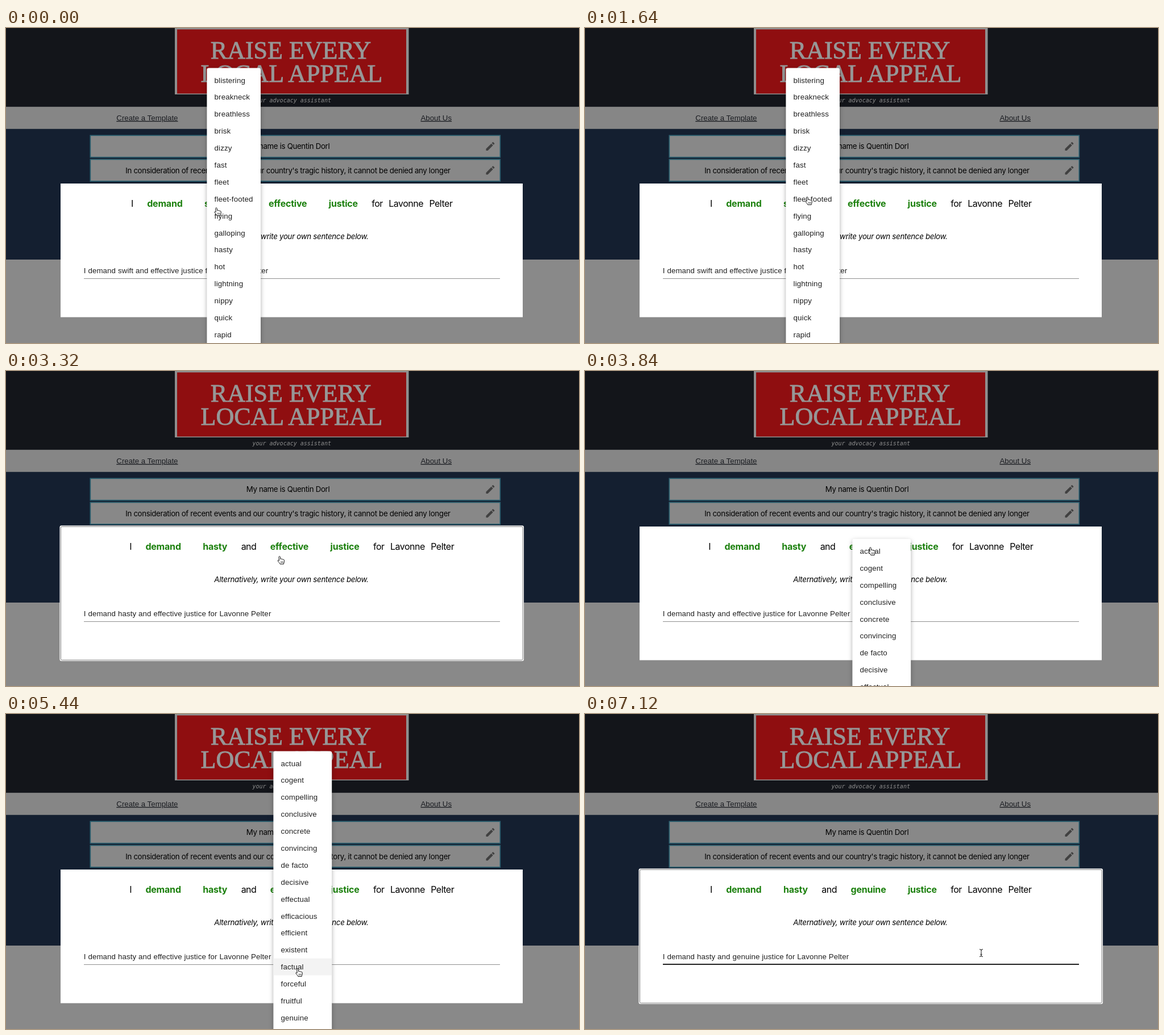
Write an HTML page that moves like this. It is 1008 px wide and 555 px high and loops after 8000 ms.

```html
<!DOCTYPE html>
<html lang="en">
<head>
<meta charset="utf-8">
<title>Sentence builder</title>
<style>
  html, body { margin: 0; width: 100%; height: 100%; overflow: hidden; background: #898989; }
  svg { display: block; width: 100vw; height: 100vh; }
  text { white-space: pre; }
  .sans { font: 13.28px "Liberation Sans", Arial, sans-serif; }
  .nav { fill: #1b1d22; text-decoration: underline; }
  .field, .item { fill: #212121; letter-spacing: .125px; }
  .card { font: 13.28px Inter, sans-serif; letter-spacing: -.33px; text-anchor: middle; }
  .hint { font: italic 13.28px Inter, sans-serif; letter-spacing: -.28px; text-anchor: middle; }
  .tag { font: italic 10px "DejaVu Sans Mono", monospace; fill: #8f8f8f; text-anchor: middle; }
  .title { font: 44px "Liberation Serif", serif; fill: #979797; stroke: #979797; stroke-width: .9; text-anchor: middle; }
  .word { font: 16px Inter, sans-serif; letter-spacing: -.5px; }
  .pick { font-weight: 700; letter-spacing: -.2px; fill: #1c800e; }
  .paper { fill: #fff; filter: drop-shadow(0 3px 3px rgba(0,0,0,.2)) drop-shadow(0 2px 5px rgba(0,0,0,.14)); }
</style>
</head>
<body>
<svg id="stage" viewBox="0 0 1008 555" preserveAspectRatio="none"></svg>
<script>
const LOOP = 8000;
const ROW = 29.88, MENU_PAD = 6.6;
const FIRST_PICK = 1900, FOCUS_LOST = 3490, MENU_OPENS = 3840, MENU_SETTLES = 3930, SECOND_PICK = 6680;
const FIELD_HOVER = 7030;
const stage = document.getElementById("stage");

function add(parent, tag, attrs = {}, content) {
  const el = document.createElementNS("http://www.w3.org/2000/svg", tag);
  for (const key in attrs) el.setAttribute(key, attrs[key]);
  if (content) el.textContent = content;
  return parent.appendChild(el);
}
const box = (parent, x, y, width, height, fill, more = {}) =>
  add(parent, "rect", { x, y, width, height, fill, ...more });
const label = (parent, x, y, cls, content) =>
  add(parent, "text", { x, y, class: cls }, content);
const show = (el, on) => el.setAttribute("visibility", on ? "visible" : "hidden");
const clamp = p => Math.min(1, Math.max(0, p));
const ease = p => p * p * (3 - 2 * p);

// Dimmed page
const PENCIL = "M3 17.25V21h3.75L17.81 9.94l-3.75-3.75zM20.71 7.04c.39-.39.39-1.02 0-1.41" +
  "l-2.34-2.34c-.39-.39-1.02-.39-1.41 0l-1.83 1.83 3.75 3.75z";

function drawCard(middle, content) {
  box(stage, 148.3, middle - 19.2, 721, 38.4, "#888", { stroke: "#2a6070", "stroke-width": 1.7 });
  label(stage, 496, middle + 4.8, "card", content);
  add(stage, "path", { d: PENCIL, fill: "#414141", transform: `translate(842 ${middle - 10}) scale(.83)` });
}

box(stage, 0, 0, 1008, 139, "#13151a");
box(stage, 297, 0, 411.5, 117, "#8f8f8f");
box(stage, 301, 2.5, 403, 113, "#8f0e10");
label(stage, 501, 53.5, "title", "RAISE EVERY");
label(stage, 502.5, 95, "title", "LOCAL APPEAL");
label(stage, 502.7, 131, "tag", "your advocacy assistant");
box(stage, 0, 138.8, 1008, 39, "#868686");
label(stage, 194.3, 162.8, "sans nav", "Create a Template");
label(stage, 729.5, 162.8, "sans nav", "About Us");
box(stage, 0, 177.8, 1008, 230.2, "#141f30");
drawCard(208.5, "My name is Quentin Dorl");
drawCard(250.7, "In consideration of recent events and our country's tragic history, it cannot be denied any longer");

// Dialog
const ring = add(stage, "g");
box(ring, 94.5, 272.3, 816.5, 238.7, "#fff", { rx: 3 });
box(stage, 96, 274, 813, 235.5, "#fff");
const ringLine = box(stage, 96.4, 274.1, 812.8, 235.2, "none", { rx: 2, stroke: "#777" });
label(stage, 502, 371.6, "hint", "Alternatively, write your own sentence below.");
const underline = box(stage, 137, 441, 732, 1, "#8f8f8f");

// Words flow in one centred row; words in *stars* are buttons with side padding
function makeSentence(source) {
  const gap = 10.4, pad = 14;
  const group = add(stage, "g");
  let x = 0;
  for (const part of source.split(" ")) {
    const pick = part[0] === "*";
    const inset = pick ? pad : 0;
    const word = label(group, x + inset, 314.7, pick ? "word pick" : "word", part.replaceAll("*", ""));
    x += word.getComputedTextLength() + 2 * inset + gap;
  }
  const left = 502.7 - (x - gap) / 2;
  for (const word of group.children) word.setAttribute("x", +word.getAttribute("x") + left);
  label(group, 136.8, 432.4, "sans field", source.replaceAll("*", ""));
  return group;
}
const sentences = ["*swift* and *effective*", "*hasty* and *effective*", "*hasty* and *genuine*"]
  .map(middle => makeSentence(`I *demand* ${middle} *justice* for Lavonne Pelter`));

// Menus
function makeMenu(x, width, items) {
  const group = add(stage, "g");
  add(group, "rect", { class: "paper", width, height: 560, rx: 3.3 });
  const hover = box(group, 0, 0, width, ROW, "#f3f3f3");
  items.split(",").forEach((item, i) =>
    label(group, 13.2, 26.2 + i * ROW, "sans item", item));
  return { group, hover, x };
}
const speedMenu = makeMenu(353.4, 94.6,
  "blistering,breakneck,breathless,brisk,dizzy,fast,fleet,fleet-footed,flying,galloping,hasty,hot,lightning,nippy,quick,rapid");
const kindMenu = makeMenu(470.4, 102.8,
  "actual,cogent,compelling,conclusive,concrete,convincing,de facto,decisive,effectual,efficacious,efficient,existent,factual,forceful,fruitful,genuine");

// close: 0 is fully open, 1 is gone; it fades first, then shrinks
function placeMenu(menu, top, close, row) {
  const shrink = clamp(close * 1.5 - .5);
  const sx = 1 - .25 * shrink, sy = 1 - .4375 * shrink;
  show(menu.group, close < 1);
  menu.group.setAttribute("opacity", 1 - close);
  menu.group.setAttribute("transform",
    `translate(${menu.x} ${top + 235 * (1 - sy)}) scale(${sx} ${sy})`);
  menu.hover.setAttribute("opacity", row < 0 ? 0 : 1);
  menu.hover.setAttribute("y", MENU_PAD + row * ROW);
}
const closing = (t, pick) => clamp((t - pick + 60) / 290) * (t >= pick);

// Pointers
const pointers = { hand: add(stage, "g"), arrow: add(stage, "g"), beam: add(stage, "g") };
const ink = { stroke: "#111", "stroke-linejoin": "round" };
add(pointers.hand, "path", { ...ink, fill: "#fff",
  d: "M3.2 8.4L2.7 2.4C2.6.2 5 .1 5.2 2.2L5.6 5.6C6.2 4.8 7.6 5 7.8 6C8.4 5.3 9.7 5.6 9.9 6.6" +
     "C10.7 6 12.2 6.4 12.2 7.8V10C12.2 12 11.2 12.4 11.2 14.4H4.8C4.6 12.8 2.1 10.8.9 8.8C.4 7.6 2 7 3.2 8.4Z" });
add(pointers.hand, "path", { ...ink, d: "M6.4 9.6v3M8.2 9.6v3M10 9.6v3", "stroke-width": .7 });
add(pointers.arrow, "path", { fill: "#000", stroke: "#fff", "stroke-width": .8,
  d: "M.8.5V12.7L3.5 10.1 5.4 14.2 7.2 13.4 5.4 9.4H9Z" });
add(pointers.beam, "path", { ...ink, fill: "none",
  d: "M-3-6.5Q0-6.5 0-4.5V4.5Q0 6.5-3 6.5M3-6.5Q0-6.5 0-4.5M0 4.5Q0 6.5 3 6.5M-1.5 2.5H1.5" });

// Each glide eases from wherever the pointer rests
const glides = [
  { from: 180, to: 520, x: 411, y: 318 },
  { from: 520, to: 1120, x: 372, y: 211 },
  { from: 1120, to: 1640, x: 387, y: 297 },
  { from: 1640, to: 1980, x: 394, y: 389 },
  { from: 2900, to: 3490, x: 498, y: 310 },
  { from: 4740, to: 4820, x: 498, y: 315 },
  { from: 4820, to: 5440, x: 509, y: 448 },
  { from: 5720, to: 6070, x: 526, y: 534 },
  { from: 6600, to: 7120, x: 697, y: 421 }
];

function pointerAt(t) {
  return glides.reduce((at, { from, to, x, y }) => {
    const p = ease(clamp((t - from) / (to - from)));
    return { x: at.x + (x - at.x) * p, y: at.y + (y - at.y) * p };
  }, { x: 366, y: 316 });
}

function pointerKind(t) {
  if (t >= FIELD_HOVER) return "beam";
  const idle = (t > FIRST_PICK + 80 && t < FOCUS_LOST - 180) || t >= SECOND_PICK;
  return idle ? "arrow" : "hand";
}

function render(t) {
  const state = (t >= FIRST_PICK) + (t >= SECOND_PICK);
  sentences.forEach((group, i) => show(group, i === state));

  const focused = (t >= FIRST_PICK && t < FOCUS_LOST) || t >= SECOND_PICK;
  show(ring, focused);
  show(ringLine, focused);

  const active = t >= FIELD_HOVER;
  underline.setAttribute("y", active ? 440 : 441);
  underline.setAttribute("height", active ? 2 : 1);
  underline.setAttribute("fill", active ? "#212121" : "#8f8f8f");

  placeMenu(speedMenu, 70.4, closing(t, FIRST_PICK), -1);

  // The highlight trails the pointer slightly
  const settled = t >= MENU_SETTLES;
  const top = settled ? 65.4 : 295.8;
  const trail = pointerAt(Math.min(t, SECOND_PICK - 80) - 90);
  const row = settled ? Math.floor((trail.y - top - MENU_PAD) / ROW) : -1;
  placeMenu(kindMenu, top, t < MENU_OPENS ? 1 : closing(t, SECOND_PICK), row);

  const kind = pointerKind(t);
  const { x, y } = pointerAt(t);
  for (const name in pointers) show(pointers[name], name === kind);
  pointers[kind].setAttribute("transform", `translate(${x} ${y})`);
}

const begin = performance.now();
function tick() {
  render((performance.now() - begin) % LOOP);
  requestAnimationFrame(tick);
}
tick();
</script>
</body>
</html>
```
